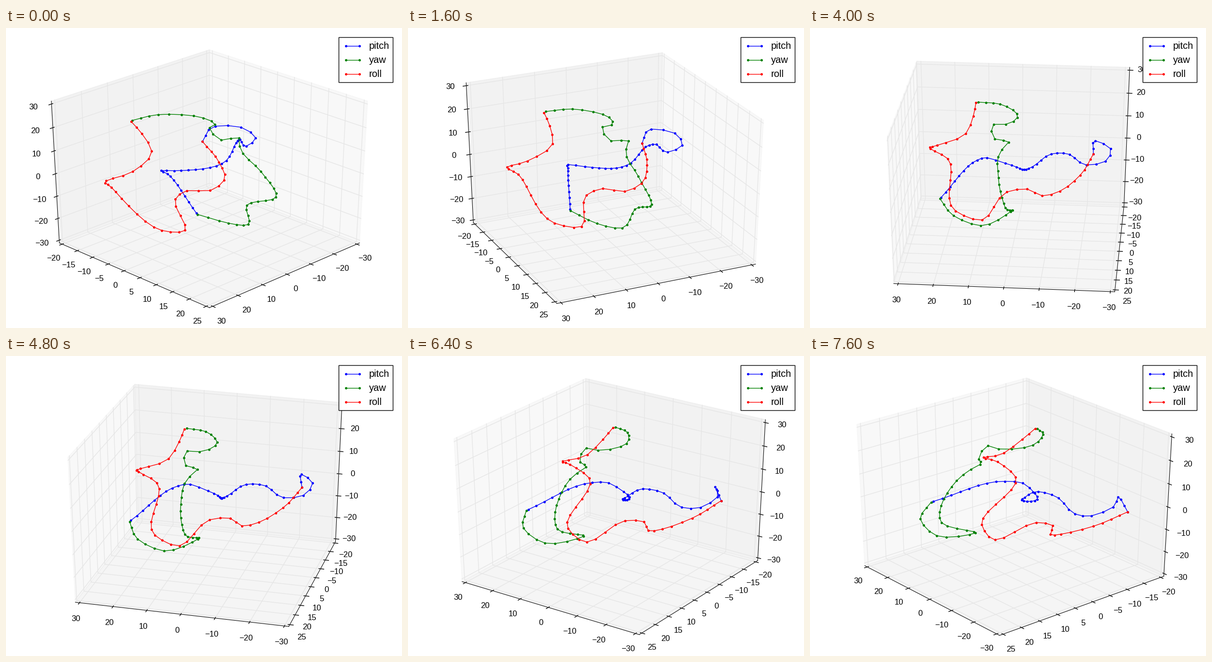
Animation, 819 px wide and 619 px high, one loop 8000 ms. Source, as a matplotlib script:

```python
import numpy as np
import matplotlib.pyplot as plt
from matplotlib.animation import FuncAnimation

WIDTH, HEIGHT, DPI = 819, 619, 64
FRAMES, INTERVAL = 20, 400
ELEV, DIST = np.radians(30), 10
START, STEP = 45, 5                      # azimuth in degrees
CENTER = np.array([420.8, 300.9])        # screen position of the cube centre
SCALE = np.array([800, -600]) / 0.185
HALF = 0.5 + 1 / 48                      # unit cube plus margin
DELTA = 1 / 12

LOW = np.array([-30, -20, -30])
HIGH = np.array([30, 25, 30])
TICK_STEP = (10, 5, 10)
PANE_GREY = (0.95, 0.90, 0.925)
CROSS = (1, 0, 0)                        # axis that each axis' tick marks follow

# Turning points of each curve: sample number, then x, y, z
PITCH = [
    (0, -21.7, -16, -4), (3, -22.4, -12.5, 4.5), (5, -27.1, -7.9, 4.6),
    (7, -26, -2.5, 3), (9, -20.6, -1.5, 1.9), (12, -15.8, 0.1, 7.5),
    (15, -10.8, 2.5, 9.2), (19, -5.5, 3.5, 4.1), (27, 3.4, -5.7, -1.7),
    (29, 8.7, -5.7, 0.5), (31, 11, -2, 2.1), (39, 19.3, 13.1, -3.1),
]
YAW = [
    (0, 11.9, -11.8, 20.4), (3, 5.2, -9.1, 21.7), (7, -0.8, 0, 22.6),
    (9, 1.8, 5.5, 23.5), (10, 5.1, 6.3, 23.9), (12, 4.4, 9.3, 19.9),
    (14, 0.3, 11.4, 20.3), (15, 2, 12.9, 18.2), (19, 2.2, 19.2, 11.1),
    (24, 0, 22.2, 0.8), (29, -0.5, 13.4, -8), (33, 7.2, 19.4, -9.7),
    (36, 14.9, 19.3, -5.8), (39, 19.5, 13.6, -3.3),
]
ROLL = [
    (0, 12.6, -11.6, 20.2), (2, 12.9, -8.1, 16.9), (4, 14.5, -3.9, 12.2),
    (7, 22.8, -3.3, 7.1), (10, 25.9, -9.1, 1.2), (13, 21.2, -11.5, -4.9),
    (20, 17.2, 0.9, -18.8), (23, 9.3, 2, -21.6), (27, 2.9, -5.9, -14.8),
    (29, -3, -6.8, -13.9), (31, -7.8, -3.1, -13.8), (33, -13, -2.7, -11.1),
    (36, -18.4, -8.3, -8), (40, -21.7, -16, -4),
]


def pt(size):
    """Points at 100 dpi, expressed at the figure's dpi."""
    return size * 100 / DPI


def to_cube(points):
    return (points - (LOW + HIGH) / 2) / (HIGH - LOW)


def smooth_curve(keys):
    """Cubic Hermite curve through the keys, one point per sample."""
    keys = np.array(keys, float)
    knots, values = keys[:, 0], keys[:, 1:]
    slopes = np.gradient(values, knots, axis=0)
    samples = np.arange(knots[-1] + 1)
    i = np.clip(np.searchsorted(knots, samples, "right") - 1, 0, len(knots) - 2)
    span = (knots[i + 1] - knots[i])[:, None]
    t = (samples - knots[i])[:, None] / span
    ease = t * t * (3 - 2 * t)
    return (values[i] * (1 - ease) + values[i + 1] * ease
            + span * t * (1 - t) * (slopes[i] * (1 - t) - slopes[i + 1] * t))


TRACES = [(name, color, to_cube(smooth_curve(keys))) for name, color, keys in
          [("pitch", "b", PITCH), ("yaw", "g", YAW), ("roll", "r", ROLL)]]

fig = plt.figure(figsize=(WIDTH / DPI, HEIGHT / DPI), dpi=DPI, facecolor="white")
ax = fig.add_axes([0, 0, 1, 1])


def camera(azim):
    """Unit vectors right, up and towards the viewer."""
    a = np.radians(azim)
    ca, sa, ce, se = np.cos(a), np.sin(a), np.cos(ELEV), np.sin(ELEV)
    return (np.array([-sa, ca, 0]),
            np.array([-ca * se, -sa * se, ce]),
            np.array([ca * ce, sa * ce, se]))


def project(points, azim):
    right, up, toward = camera(azim)
    points = np.asarray(points, float)
    depth = DIST - points @ toward
    flat = np.stack([points @ right, points @ up], axis=-1)
    return CENTER + SCALE * flat / depth[..., None]


def stroke(points, azim, **style):
    ax.plot(*project(points, azim).T, **style)


def write(x, y, text, size, layer, **align):
    ax.text(x - 0.5, y - 0.5, text, family="Liberation Sans", fontsize=pt(size),
            zorder=layer, **align)


def flipped(point, axis):
    other = point.copy()
    other[axis] *= -1
    return other


def at(point, axis, value):
    other = point.copy()
    other[axis] = value
    return other


def draw_pane(axis, far, azim):
    grey = str(PANE_GREY[axis])
    a, b = (axis + 1) % 3, (axis + 2) % 3
    corners = [far, flipped(far, a), flipped(flipped(far, a), b), flipped(far, b)]
    ax.fill(*project(corners, azim).T, facecolor=grey, edgecolor=grey,
            alpha=0.5, lw=pt(1), zorder=0)


def draw_axis(axis, far, azim):
    cross, layer = CROSS[axis], 1 + axis
    edge = flipped(far, cross)
    stroke([edge, flipped(edge, axis)], azim, color="k", lw=pt(0.75), zorder=layer)
    low, high = LOW[axis], HIGH[axis]
    values = range(low, high + 1, TICK_STEP[axis])
    places = [(v - (low + high) / 2) / (high - low) for v in values]

    for place in places:
        base = at(far, axis, place)
        ends = flipped(base, (axis + 1) % 3), flipped(base, (axis + 2) % 3)
        stroke([ends[0], base, ends[1]], azim, color="0.9", lw=pt(1), zorder=layer)

    inward = np.sign(far[cross]) * DELTA
    for value, place in zip(values, places):
        mark = at(edge, axis, place)
        stroke([at(mark, cross, edge[cross] + 0.1 * inward),
                at(mark, cross, edge[cross] - 0.2 * inward)],
               azim, color="k", lw=pt(1), zorder=layer)
        spot = at(edge + np.sign(edge) * 0.7 * DELTA, axis, place)
        write(*project(spot, azim), str(value).replace("-", "\u2212"), 12, layer,
              ha="center", va="top")


def draw_trace(x, y, color, layer):
    ax.plot(x, y, color=color, lw=pt(1), marker=".", ms=pt(6), mew=pt(0.5),
            zorder=layer)


def draw_legend():
    ax.add_patch(plt.Rectangle((688, 19), 112, 93, facecolor="w", edgecolor="k",
                               lw=pt(1), zorder=6))
    for row, (name, color, _) in enumerate(TRACES):
        y = 36.5 + 29 * row
        draw_trace([702.5, 730.5], [y, y], color, 7)
        write(751, y + 7, name, 14.4, 7, va="baseline")


def draw(frame):
    azim = START + STEP * frame
    ax.clear()
    ax.set_xlim(0, WIDTH)
    ax.set_ylim(HEIGHT, 0)
    ax.axis("off")
    far = np.where(camera(azim)[2] > 0, -HALF, HALF)
    for axis in range(3):
        draw_pane(axis, far, azim)
    for axis in range(3):
        draw_axis(axis, far, azim)
    for _, color, points in TRACES:
        draw_trace(*project(points, azim).T, color, 5)
    draw_legend()
    return []


anim = FuncAnimation(fig, draw, frames=FRAMES, interval=INTERVAL,
                     init_func=lambda: [], repeat=True, repeat_delay=0)
plt.show()
```
